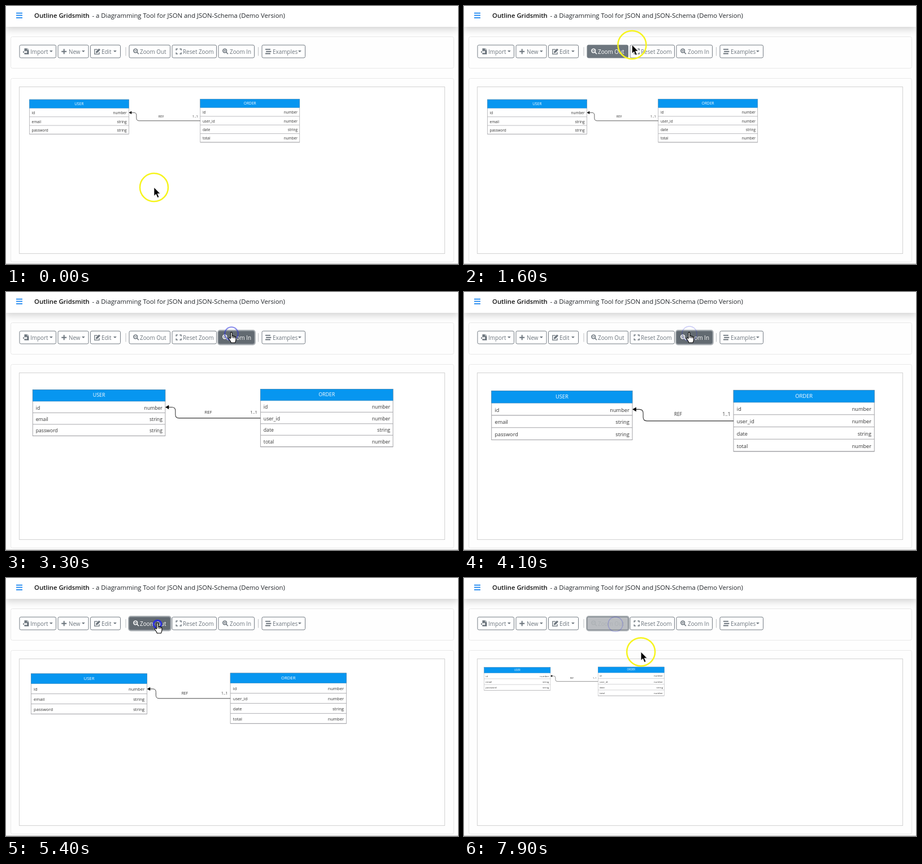
These frames come from a looping animation (800x458 px, 8000 ms). An HTML page:

```html
<!DOCTYPE html>
<html lang="en">
<head>
<meta charset="utf-8">
<style>
  html, body { margin: 0; width: 100%; height: 100%; overflow: hidden; background: #fff; }
  svg { display: block; width: 100vw; height: 100vh; font-family: "Open Sans", "Noto Sans", sans-serif; }
  .nav { filter: drop-shadow(0 5.6px 5.6px rgba(0, 0, 0, .16)); }
  .card { fill: #fefefe; stroke: #e8e8e8; }
  .icon { fill: none; stroke: currentColor; stroke-width: 1.6; }
  .solid { fill: currentColor; stroke: none; }
  .btn text { fill: currentColor; font-size: 9.9px; }
  .table text { fill: #333; font-size: 5.4px; }
  .table .title { fill: #fff; font-size: 5.5px; text-anchor: middle; }
  .end { text-anchor: end; }
  .label { fill: #333; font-size: 4.8px; text-anchor: middle; }
</style>
</head>
<body>
<svg viewBox="0 0 800 458" preserveAspectRatio="none">
  <rect width="800" height="458" fill="#fefefe"/>
  <rect class="nav" width="800" height="37" fill="#fff"/>
  <path d="M18 12.6H29M18 16.7H29M18 20.8H29" stroke="#1683f0" stroke-width="1.8"/>
  <g font-size="11.3" fill="#212529">
    <text x="50" y="21" font-weight="600" fill="#111">Outline Gridsmith</text>
    <text x="152.5" y="21">- a Diagramming Tool for JSON and JSON-Schema (Demo Version)</text>
  </g>
  <rect class="card" x="8.5" y="54.5" width="784" height="56" rx="3"/>
  <rect class="card" x="8.5" y="128.5" width="784" height="326" rx="3"/>
  <rect x="23.5" y="143.5" width="753" height="296" fill="#fff" stroke="#d2d2d2"/>
  <path d="M0 457.5H800" stroke="#c4c4c4"/>
  <path d="M212 73V88.5M446.5 73V88.5" stroke="#bfc2c5"/>
  <g id="buttons"></g>
  <g id="diagram">
    <g id="tables"></g>
    <path d="M164 38.2H168.4Q172.4 38.2 172.4 42.2V46.3Q172.4 50.3 176.4 50.3H266.5" fill="none" stroke="#333" stroke-width=".65"/>
    <path d="M161.2 38.2L165.2 35.9V40.5Z"/>
    <text class="label" x="208.8" y="45.1">REF</text>
    <text class="label" x="259.1" y="45.1">1..1</text>
  </g>
  <circle id="ripple" fill="none" stroke="#2a30dc"/>
  <g id="pointer">
    <circle id="halo" r="25" fill="none" stroke="#f6f41c" stroke-width="2.5"/>
    <path id="arrow" d="M0 0V15.2L3.5 12L6.2 18.3L8.8 17.2L6.1 11.1H10.8Z" stroke="#fff" stroke-width=".7"/>
    <path id="hand" d="M-1.5 7V-1.2Q-1.5 -2.6 -.2 -2.6T1.1 -1.2V4Q3 3 3.6 4.6Q5.4 3.9 5.9 5.5Q8 5 8 7.2V10Q8 13 6.4 16H-.6Q-1.6 13 -4 10Q-5.2 7.6 -3.5 7.3Q-2.4 7.2 -1.5 8.6ZM1.1 4V7.5M3.6 4.8V8M5.9 5.8V8.2" fill="#fff" stroke="#000" stroke-width="1.1" stroke-linejoin="round"/>
  </g>
</svg>
<script>
const LOOP = 8000;
const $ = id => document.getElementById(id);
const clamp = v => Math.max(0, Math.min(1, v));

// Toolbar
const lens = sign => `<circle cx="4.2" cy="4.2" r="3.3"/><path d="M6.7 6.7L10 10"/><path stroke-width="1" d="${sign}"/>`;
const icons = {
  import: '<path class="solid" d="M2.5 0H7.5V3H10.5V10.5H2.5V7.6H5V9L8 6.4L5 3.8V5.2H2.5ZM8.2 0L10.5 2.3H8.2ZM0 5.3H2V7.4H0Z"/>',
  plus: '<path stroke-width="2" d="M4.7 1V10M.2 5.5H9.2"/>',
  edit: '<path stroke-width="1.3" d="M6 1.8H.8V10H9V6.5"/><path class="solid" d="M3.2 5.5L8.6 .1L11 2.5L5.6 7.9L3 8.2Z"/>',
  minus: lens('M2.4 4.2H6'),
  expand: '<path d="M.8 3.5V1H3.4M6.9 1H9.5V3.5M9.5 7.2V9.7H6.9M3.4 9.7H.8V7.2"/>',
  zoom: lens('M2.4 4.2H6M4.2 2.4V6'),
  lines: '<path stroke-width="1.9" d="M0 1.6H9M1.2 5.4H10.4M0 9.2H9"/>'
};
// label, icon, left, right, icon x, text x, caret x, hover spans
const buttons = [
  ['Import', 'import', 24, 89, 30, 43, 77, []],
  ['New', 'plus', 92, 146.5, 98, 111, 134, []],
  ['Edit', 'edit', 149.5, 203, 156, 169, 190, []],
  ['Zoom Out', 'minus', 218, 291, 225, 237, 0, [[1360, 1600], [4620, 7817]]],
  ['Reset Zoom', 'expand', 294, 373, 300.5, 313, 0, [[1640, 1720], [4280, 4560]]],
  ['Zoom In', 'zoom', 376, 440, 383, 396, 0, [[1740, 4260]]],
  ['Examples', 'lines', 453, 530, 459, 472, 517, []]
].map(([label, icon, left, right, ix, tx, caret, spans]) => ({ label, icon, left, right, ix, tx, caret, spans }));

$('buttons').innerHTML = buttons.map(b => `<g class="btn">
  <rect x="${b.left - .7}" y="68.3" width="${b.right - b.left + 1.4}" height="24.9" rx="3.5" fill="none" stroke="#6c757d" stroke-opacity=".55" stroke-width="2.4"/>
  <rect x="${b.left}" y="69.3" width="${b.right - b.left - .5}" height="22.7" rx="2.5" stroke="#747c84"/>
  <g class="icon" transform="translate(${b.ix} 75.3)">${icons[b.icon]}</g>
  <text x="${b.tx}" y="84.6">${b.label}</text>
  ${b.caret ? `<path class="solid" d="M${b.caret} 79h5.8l-2.9 3z"/>` : ''}</g>`).join('');
[...$('buttons').children].forEach((el, i) => {
  buttons[i].el = el;
  [buttons[i].focus, buttons[i].face] = el.children;
});

// Diagram, in units of zoom 1
const HEAD = 12.7, ROW = 12.8, WIDTH = 146.6;
function table(x, y, title, fields) {
  const rows = fields.map(([name, type], i) => {
    const top = HEAD + i * ROW;
    return `<path d="M0 ${top + ROW}H${WIDTH}" stroke="#a4a4a8" stroke-width=".6"/>
      <text x="3.4" y="${top + 9.1}">${name}</text>
      <text class="end" x="${WIDTH - 3.1}" y="${top + 9.1}">${type}</text>`;
  }).join('');
  return `<g class="table" transform="translate(${x} ${y})">
    <rect width="${WIDTH}" height="${HEAD + fields.length * ROW}" fill="#fff" stroke="#a4a4a8" stroke-width=".6"/>
    <rect width="${WIDTH}" height="${HEAD}" fill="#0796f0" stroke="#3a86b8" stroke-width=".4"/>
    <text class="title" x="${WIDTH / 2}" y="7.9">${title}</text>${rows}</g>`;
}
$('tables').innerHTML =
  table(14.55, 18.9, 'USER', [['id', 'number'], ['email', 'string'], ['password', 'string']]) +
  table(266.5, 18.2, 'ORDER', [['id', 'number'], ['user_id', 'number'], ['date', 'string'], ['total', 'number']]);

// Timeline
const zoomIns = [2210, 2500, 2820, 3150, 3480];
const zoomOuts = [4850, 5080, 5380, 5680, 5960, 6310, 6600, 6920, 7220];
const clicks = [...zoomIns, ...zoomOuts];
const path = [
  [0, 262, 322], [330, 262, 322], [500, 215, 332], [700, 62, 182], [850, 130, 140],
  [1200, 510, 153], [1480, 240, 82], [1600, 297, 69], [1850, 399, 74], [4080, 399, 74],
  [4750, 268, 82], [7640, 268, 82], [7900, 313, 131], [8000, 320, 138]
];
const count = (list, t) => list.filter(c => c <= t).length;

// Velocity at a key; zero next to a pause
function slope(i, k) {
  const a = path[i - 1], b = path[i], c = path[i + 1];
  if (!a || !c || a[k] === b[k] || b[k] === c[k]) return 0;
  if ((b[k] - a[k]) * (c[k] - b[k]) < 0) return 0;
  return (c[k] - a[k]) / (c[0] - a[0]);
}
function cursorAt(t) {
  const i = path.findLastIndex(p => p[0] <= t);
  const a = path[i], b = path[i + 1] || a;
  const d = b[0] - a[0] || 1, u = (t - a[0]) / d, v = 1 - u;
  return [1, 2].map(k =>
    v * v * (1 + 2 * u) * a[k] + u * u * (3 - 2 * u) * b[k] +
    d * u * v * (v * slope(i, k) - u * slope(i + 1, k)));
}

const mix = (from, to, k) => `rgb(${from.map((v, i) => Math.round(v + (to[i] - v) * k))})`;
const WHITE = [255, 255, 255], GRAY = [108, 117, 125], DARK = [98, 106, 113];
const show = (id, on) => $(id).setAttribute('visibility', on ? 'visible' : 'hidden');

function draw(t) {
  const zoom = 1.2 + .1 * (count(zoomIns, t) - count(zoomOuts, t));
  $('diagram').setAttribute('transform', `translate(24 143.4) scale(${zoom})`);

  const focused = t >= zoomOuts[0] ? 'Zoom Out' : t >= zoomIns[0] ? 'Zoom In' : '';
  for (const b of buttons) {
    const k = b.spans.reduce((sum, [on, off]) => sum + clamp((t - on) / 150) - clamp((t - off) / 150), 0);
    const focus = b.label === focused;
    b.focus.setAttribute('visibility', focus ? 'visible' : 'hidden');
    b.face.setAttribute('fill', mix(WHITE, focus ? DARK : GRAY, k));
    b.el.style.color = mix(GRAY, WHITE, k);
  }

  const [x, y] = cursorAt(t);
  const hand = y > 69.5 && y < 92 && buttons.some(b => x > b.left && x < b.right);
  $('pointer').setAttribute('transform', `translate(${x} ${y})`);
  show('hand', hand);
  show('arrow', !hand);
  show('halo', t < 2190 || (t > 4120 && t < 4850) || t > 7650);

  const last = clicks[count(clicks, t) - 1];
  const rippleOn = last && !(t > 4300 && t < 4850);
  show('ripple', rippleOn);
  if (rippleOn) {
    const age = t - last, fade = Math.exp(-((age / 160) ** 2));
    const spot = cursorAt(last);
    const set = { cx: spot[0], cy: spot[1], r: 5 + 8 * (1 - Math.exp(-age / 80)),
      'stroke-width': 1.4 + 1.6 * fade, 'stroke-opacity': .25 + .75 * fade };
    for (const k in set) $('ripple').setAttribute(k, set[k]);
  }
}

function frame(now) {
  draw(now % LOOP);
  requestAnimationFrame(frame);
}
draw(0);
requestAnimationFrame(frame);
</script>
</body>
</html>
```
